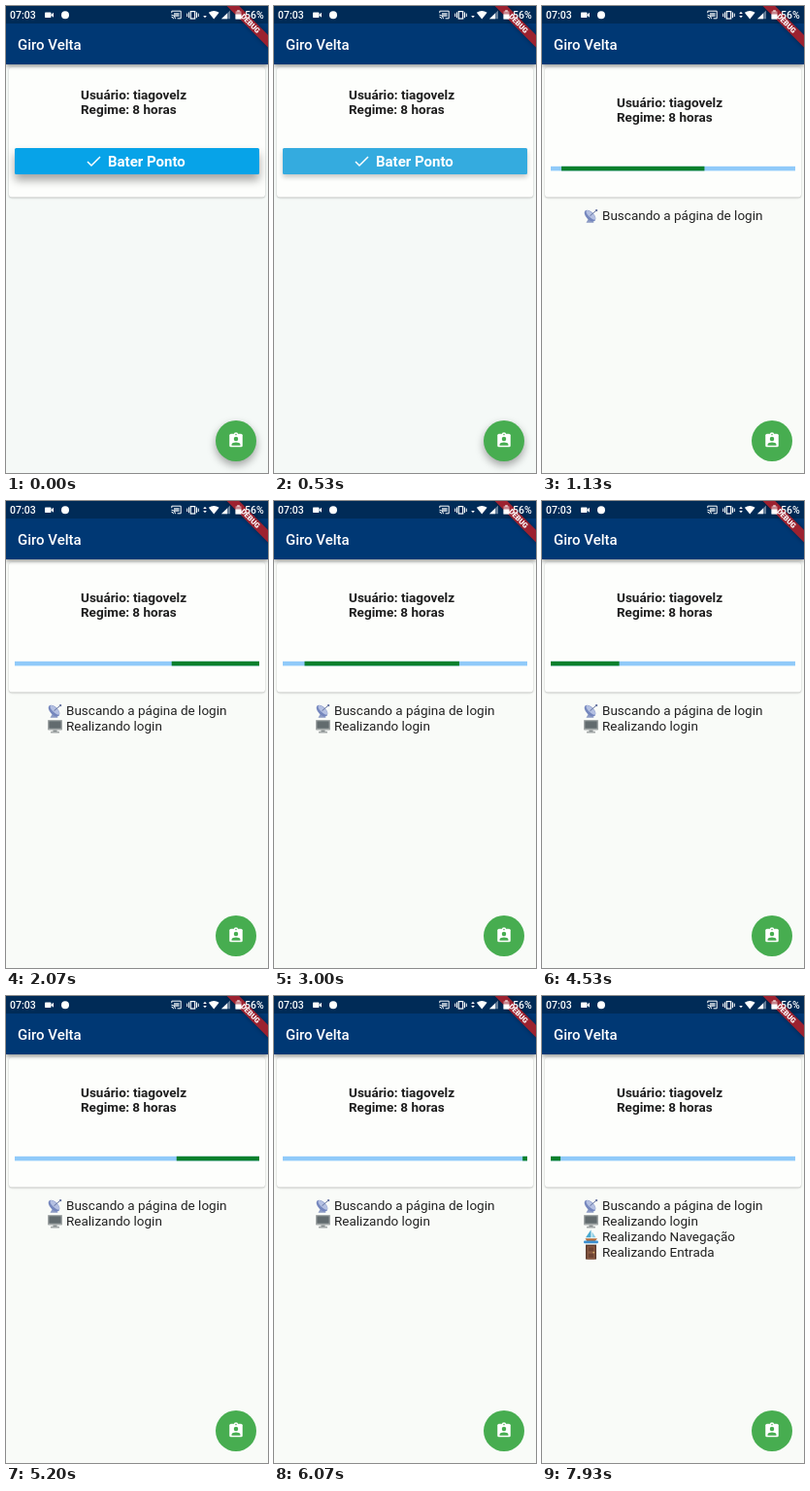
Write an HTML page with a canvas that moves like this. It is 270x480 px and loops after 8000 ms.

```html
<!DOCTYPE html>
<html lang="pt">
<head>
<meta charset="utf-8">
<style>
  html, body { margin: 0; width: 100%; height: 100%; overflow: hidden; background: #f9fbf8; }
  canvas { display: block; width: 270px; height: 480px; }
</style>
</head>
<body>
<canvas id="stage"></canvas>
<script>
const W = 270, H = 480, LOOP = 8000, BAR_START = 670;
const canvas = document.getElementById('stage');
const ctx = canvas.getContext('2d');
const dpr = window.devicePixelRatio || 1;
canvas.width = W * dpr;
canvas.height = H * dpr;

const clamp = v => Math.min(1, Math.max(0, v));

// Progress clock: [time, phase]; flat stretches are stalls.
const CLOCK = [
  [670, 0], [800, 120], [1070, 120], [1070, 392], [1130, 452], [1530, 690],
  [1670, 690], [2070, 900], [2600, 1910], [3800, 3108], [5200, 4512],
  [6070, 5330], [7200, 5330], [7200, 6520], [7270, 6520], [7270, 6590],
  [7470, 6590], [7470, 6790], [7930, 6790], [7930, 7266], [8000, 7266]
];

function phaseAt(time) {
  let i = 0;
  while (i < CLOCK.length - 2 && CLOCK[i + 1][0] <= time) i++;
  const [t0, p0] = CLOCK[i], [t1, p1] = CLOCK[i + 1];
  return (p0 + (p1 - p0) * clamp((time - t0) / (t1 - t0))) % 1800;
}

// Bezier easing with control points (x1, 0) and (x2, 1), over a time interval.
function ease(t, start, length, x1, x2) {
  const x = clamp((t - start) / length);
  let lo = 0, hi = 1;
  for (let i = 0; i < 24; i++) {
    const s = (lo + hi) / 2, r = 1 - s;
    if (3 * r * r * s * x1 + 3 * r * s * s * x2 + s * s * s < x) lo = s; else hi = s;
  }
  return lo * lo * (3 - 2 * lo);
}

function rect(x, y, w, h, color) {
  ctx.fillStyle = color;
  ctx.fillRect(x, y, w, h);
}

function roundRect(x, y, w, h, r, color) {
  ctx.fillStyle = color;
  ctx.beginPath();
  ctx.roundRect(x, y, w, h, r);
  ctx.fill();
}

function disc(x, y, r, color) {
  ctx.fillStyle = color;
  ctx.beginPath();
  ctx.arc(x, y, r, 0, Math.PI * 2);
  ctx.fill();
}

function trace(points) {
  ctx.beginPath();
  points.forEach(([x, y], i) => i ? ctx.lineTo(x, y) : ctx.moveTo(x, y));
}

function poly(color, ...points) {
  trace(points);
  ctx.fillStyle = color;
  ctx.fill();
}

function line(color, width, ...points) {
  trace(points);
  ctx.strokeStyle = color;
  ctx.lineWidth = width;
  ctx.stroke();
}

function text(str, x, y, size, weight, color, align = 'left') {
  ctx.font = `${weight} ${size}px Roboto, sans-serif`;
  ctx.textAlign = align;
  ctx.textBaseline = 'alphabetic';
  ctx.fillStyle = color;
  ctx.fillText(str, x, y);
}

function withShadow(alpha, blur, dy, draw) {
  ctx.save();
  ctx.shadowColor = `rgba(0,0,0,${alpha})`;
  ctx.shadowBlur = blur * dpr;
  ctx.shadowOffsetY = dy * dpr;
  draw();
  ctx.restore();
}

function drawBanner() {
  ctx.save();
  ctx.translate(W, 0);
  ctx.rotate(Math.PI / 4);
  withShadow(0.4, 4, 0, () => rect(-32, 21, 64, 9, '#9c2230'));
  text('DEBUG', 0, 28.2, 7.6, 900, '#fff', 'center');
  ctx.restore();
}

function drawStatus(time) {
  const white = '#fff';
  text('07:03', 4, 13, 10.5, 500, white);
  roundRect(40, 6.5, 6.5, 5.5, 0.8, white);
  poly(white, [46, 9.2], [49, 6.7], [49, 11.8]);
  disc(61, 9.2, 4, white);

  // cast
  line(white, 1, [170.8, 7.2], [170.8, 5.2], [180.2, 5.2], [180.2, 12.8], [176.6, 12.8]);
  rect(173, 7, 5.5, 4, 'rgba(255,255,255,.65)');
  ctx.strokeStyle = white;
  for (const r of [2, 4]) {
    ctx.beginPath();
    ctx.arc(170.5, 13.2, r, -Math.PI / 2, 0);
    ctx.stroke();
  }

  // vibrate
  ctx.lineWidth = 1.2;
  ctx.strokeRect(190.3, 5.6, 4.4, 7.4);
  for (const side of [-1, 1]) {
    line(white, 1, [192.5 + side * 4, 6.4], [192.5 + side * 4, 12.2]);
    line(white, 1, [192.5 + side * 5.8, 7.6], [192.5 + side * 5.8, 11]);
  }

  // data arrows
  poly(white, [203.2, 10], [206.8, 10], [205, 12.2]);
  const sending = (time >= 800 && time < 2900) || (time >= 4270 && time < 6670);
  if (sending) poly(white, [203.2, 8], [206.8, 8], [205, 5.8]);

  // wifi
  ctx.fillStyle = white;
  ctx.beginPath();
  ctx.moveTo(214.2, 13.4);
  ctx.lineTo(208.8, 6.8);
  ctx.quadraticCurveTo(214.2, 3, 219.6, 6.8);
  ctx.fill();

  // signal
  poly('rgba(255,255,255,.4)', [222, 13.3], [231, 13.3], [231, 4.5]);
  poly(white, [222, 13.3], [228, 13.3], [228, 7.5]);

  // battery
  rect(238.2, 4.4, 2.6, 1.2, white);
  roundRect(236.5, 5.3, 6, 8.2, 0.6, 'rgba(255,255,255,.45)');
  rect(236.5, 8.5, 6, 5, white);
  text('56%', 246, 13, 10.5, 500, white);
}

function drawHeader(time) {
  withShadow(0.4, 4, 2, () => rect(0, 0, W, 60, '#003874'));
  rect(0, 0, W, 18, '#002b57');
  text('Giro Velta', 12, 45, 15, 500, '#fff');
  drawBanner();
  drawStatus(time);
}

function drawButton(time) {
  const press = 1 - clamp((time - 350) / 250);
  withShadow(0.16 + 0.2 * press, 4 + 6 * press, 2 + 4 * press,
    () => roundRect(9, 146, 252, 27, 1.5, '#07a3e8'));
  if (time >= 70) {
    const fade = 1 - clamp((time - 400) / 270);
    ctx.save();
    ctx.beginPath();
    ctx.rect(9, 146, 252, 27);
    ctx.clip();
    rect(9, 146, 252, 27, `rgba(188,188,188,${0.25 * fade * clamp((time - 70) / 150)})`);
    disc(135, 159.5, 10 + 130 * clamp((time - 70) / 400), `rgba(200,200,200,${0.25 * fade})`);
    ctx.restore();
  }
  line('#fff', 1.5, [84, 160], [88, 164], [97, 155]);
  text('Bater Ponto', 105, 165, 15, 700, '#fff');
}

function drawProgress(time) {
  const t = phaseAt(time);
  const segment = (tail, head) => {
    if (head > tail) rect(9 + 252 * tail, 164.8, 252 * (head - tail), 4.6, '#0a802c');
  };
  rect(9, 164.8, 252, 4.6, '#90caf9');
  segment(ease(t, 333, 750, 0.4, 1), ease(t, 0, 750, 0.2, 0.8));
  segment(ease(t, 1267, 533, 0.1, 0.45), ease(t, 1000, 567, 0, 0.65));
}

// Icons live in a 16 by 16 box.
function dishIcon() {
  poly('#8c9bc4', [3, 15], [7, 8], [11, 15]);
  ctx.save();
  ctx.translate(7, 8);
  ctx.rotate(Math.PI / 4);
  ctx.fillStyle = '#7486bd';
  ctx.beginPath();
  ctx.ellipse(0, 0, 7.2, 4, 0, 0, Math.PI * 2);
  ctx.fill();
  ctx.fillStyle = '#b4c0e2';
  ctx.beginPath();
  ctx.ellipse(0, -1.2, 6.4, 2.5, 0, 0, Math.PI * 2);
  ctx.fill();
  ctx.restore();
  line('#65739f', 1, [7, 8], [14, 2]);
  disc(13.6, 2.4, 1.2, '#65739f');
}

function screenIcon() {
  roundRect(0.5, 1.5, 15, 10.5, 0.8, '#a3a8a8');
  rect(1.8, 2.8, 12.4, 7.4, '#626b6e');
  rect(6, 12, 4, 1.6, '#858b8c');
  roundRect(3.5, 13.2, 9, 1.8, 0.6, '#a3a8a8');
}

function boatIcon() {
  poly('#48a9cf', [8, 1], [8, 9], [2.5, 9]);
  poly('#8ed0e6', [9, 3], [9, 9], [13, 9]);
  poly('#b36b3a', [2, 10], [14.5, 10], [12, 13], [4, 13]);
  roundRect(0.5, 12.2, 15, 2.8, 1.2, '#3c8fd0');
}

function doorIcon() {
  rect(2.5, 0.5, 11, 15, '#5c3b2e');
  rect(4, 2, 8, 13.5, '#8b5a43');
  rect(5.3, 3.3, 5.4, 4, '#6e4433');
  rect(5.3, 9.6, 5.4, 4.2, '#6e4433');
  disc(10.8, 8.5, 0.9, '#d9b166');
}

const MESSAGES = [
  [BAR_START, dishIcon, 'Buscando a página de login'],
  [1670, screenIcon, 'Realizando login'],
  [7200, boatIcon, 'Realizando Navegação'],
  [7270, doorIcon, 'Realizando Entrada']
];

function drawMessages(time) {
  MESSAGES.forEach(([start, icon, label], row) => {
    if (time < start) return;
    const y = 220.3 + row * 15.8;
    ctx.save();
    ctx.translate(42.5, y - 12.6);
    icon();
    ctx.restore();
    text(label, 62, y, 13.5, 400, '#222');
  });
}

function drawFab(raised) {
  const green = '#47ad50';
  withShadow(raised ? 0.35 : 0, 8, 4, () => disc(237, 447, 21, green));
  ctx.save();
  ctx.translate(228, 437.5);
  ctx.scale(0.75, 0.75);
  disc(12, 4, 3, '#fff');
  roundRect(3, 3, 18, 18, 2, '#fff');
  disc(12, 4, 1, green);
  disc(12, 10, 3, green);
  ctx.fillStyle = green;
  ctx.beginPath();
  ctx.moveTo(6, 19);
  ctx.lineTo(6, 17.6);
  ctx.bezierCurveTo(6, 13.5, 18, 13.5, 18, 17.6);
  ctx.lineTo(18, 19);
  ctx.fill();
  ctx.restore();
}

function draw(time) {
  const idle = time < BAR_START;
  ctx.setTransform(dpr, 0, 0, dpr, 0, 0);
  rect(0, 0, W, H, idle ? '#f5f9f7' : '#f9fbf8');
  withShadow(0.28, 2, 0.8, () => roundRect(3, 63, 264, 133.5, 3, '#fdfefc'));
  drawHeader(time);

  const top = idle ? 95.5 : 103.5;
  text('Usuário: tiagovelz', 77, top, 13.5, 700, '#1e1e1e');
  text('Regime: 8 horas', 77, top + 15.7, 13.5, 700, '#1e1e1e');

  if (idle) drawButton(time); else drawProgress(time);
  drawMessages(time);
  drawFab(idle);
}

const began = performance.now();
function tick() {
  draw((performance.now() - began) % LOOP);
  requestAnimationFrame(tick);
}
tick();
</script>
</body>
</html>
```
